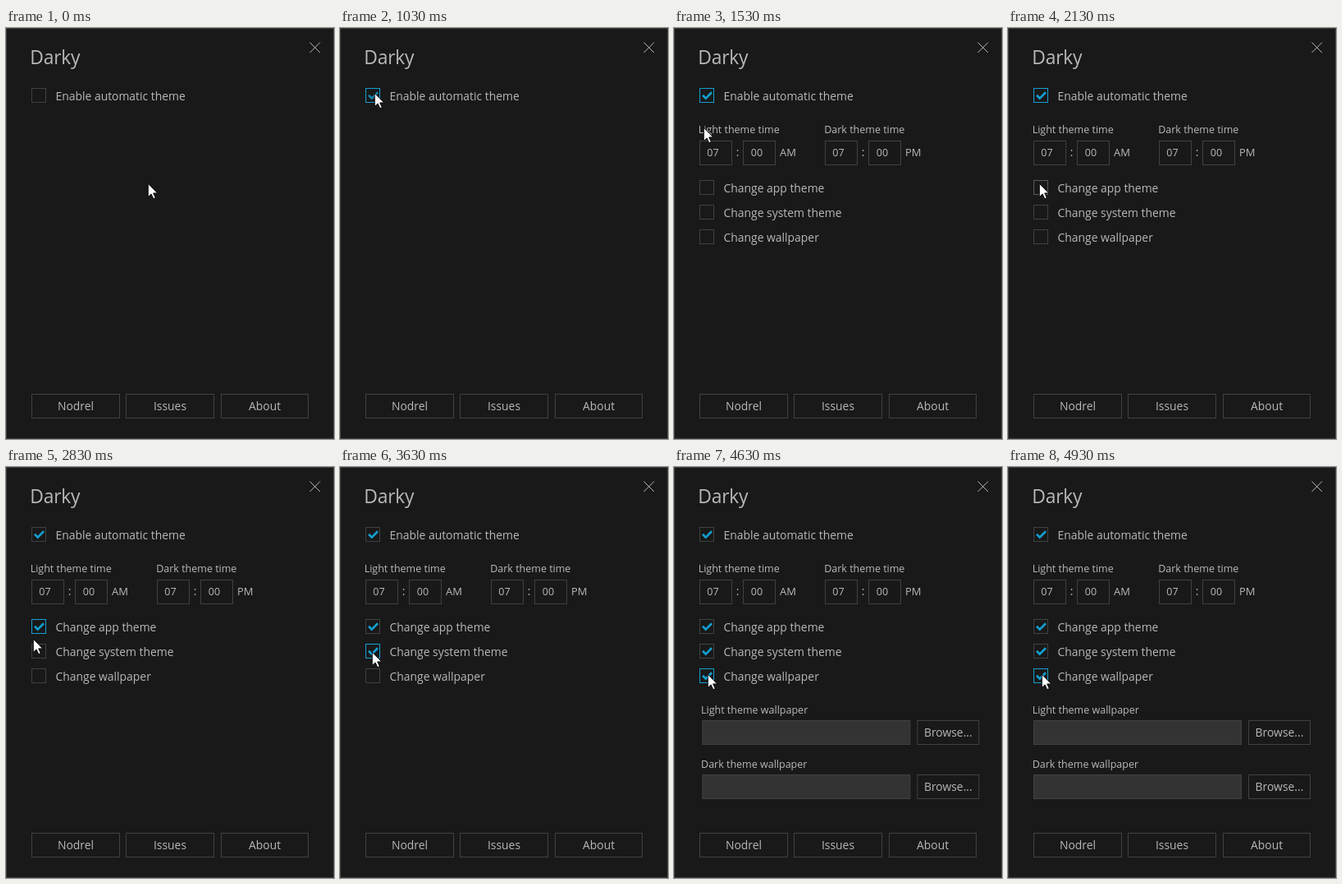
Animation, 400 px wide and 500 px high, one loop 5.21 s. Source, as an HTML page:

```html
<!DOCTYPE html>
<html>
<head>
<meta charset="utf-8">
<style>
html, body { margin: 0; width: 100%; height: 100%; overflow: hidden; background: #191919; }
svg { display: block; font: 13.9px "Open Sans", "Noto Sans", sans-serif; }
text { fill: #b9b9b9; white-space: pre; }
.small { font-size: 12.5px; }
.mid { text-anchor: middle; }
</style>
</head>
<body>
<svg id="stage" width="400" height="500" viewBox="0 0 400 500"></svg>
<script>
const LOOP = 5210, ACCENT = '#149fd0', LINE = '#414141';
const stage = document.getElementById('stage');

function add(parent, tag, attrs, content = '') {
  const node = document.createElementNS('http://www.w3.org/2000/svg', tag);
  for (const key in attrs) node.setAttribute(key, attrs[key]);
  node.textContent = content;
  parent.append(node);
  return node;
}
const group = () => add(stage, 'g', {});
const text = (parent, x, y, content, cls = '') => add(parent, 'text', { x, y, class: cls }, content);
const box = (parent, x, y, width, height, fill = 'none') =>
  add(parent, 'rect', { x: x + .5, y: y + .5, width: width - 1, height: height - 1, fill, stroke: LINE });
function button(parent, x, y, width, label) {
  box(parent, x, y, width, 30);
  text(parent, x + width / 2, y + 20, label, 'mid');
}

// Window frame
box(stage, 0, 0, 400, 500);
add(stage, 'text', { x: 29.3, y: 44, 'font-size': 22.8, 'letter-spacing': -.2 }, 'Darky');
add(stage, 'path', { d: 'M370.5 17.5l12.5 12.5m0-12.5l-12.5 12.5', stroke: '#b9b9b9', fill: 'none' });
['Nodrel', 'Issues', 'About'].forEach((label, i) => button(stage, [31, 146, 262][i], 445, i == 2 ? 107 : 108, label));

// Schedule panel
const schedule = group();
[['Light', 30, 'AM'], ['Dark', 183.5, 'PM']].forEach(([name, x, half]) => {
  const left = Math.floor(x) + 1;
  text(schedule, x - .3, 128, name + ' theme time', 'small');
  box(schedule, left, 137, 40, 30);
  box(schedule, left + 53, 137, 40, 30);
  text(schedule, left + 16.5, 156, '07', 'small mid');
  text(schedule, left + 70, 156, '00', 'small mid');
  text(schedule, left + 46.5, 156, ':', 'mid');
  add(schedule, 'text', { x: left + 98, y: 156, 'font-size': 13 }, half);
});

// Wallpaper panel
const wallpaper = group();
['Light', 'Dark'].forEach((name, i) => {
  const y = 308 + 66 * i;
  text(wallpaper, 29.7, y - 8, name + ' theme wallpaper', 'small');
  box(wallpaper, 31, y, 254, 30, '#333');
  button(wallpaper, 293, y, 76, 'Browse...');
});

// Check boxes: row top, label, press time, release time
const checks = [
  [stage, 73, 'Enable automatic theme', 930, 1015],
  [schedule, 185, 'Change app theme', 2250, 2350],
  [schedule, 215, 'Change system theme', 3440, 3540],
  [schedule, 245, 'Change wallpaper', 4370, 4460],
].map(([parent, y, label, press, release]) => {
  text(parent, 60.5, y + 15, label);
  return {
    y, press, release,
    frame: box(parent, 31, y, 18, 18),
    tick: add(parent, 'path', { d: `M35 ${y + 8.8}l3.7 3.8l7.3-7.4`, fill: 'none', stroke: ACCENT, 'stroke-width': 2.7 }),
  };
});

const cursor = add(stage, 'path', {
  d: 'M0 0V16.2L3.8 12.6L6.5 18.4L9 17.3L6.4 11.6H11.4Z',
  fill: '#fff', stroke: '#000', 'stroke-width': .9,
});

// Pointer path: time, x, y
const path = [
  [0, 173, 189], [680, 42, 79], [1190, 42, 79], [1530, 36, 121], [1630, 36, 136], [1950, 38, 189],
  [2600, 38, 189], [2830, 33, 209], [3110, 38, 225], [3210, 38, 225], [3230, 39, 225],
  [3740, 39, 225], [3930, 33, 232], [4130, 41, 252], [LOOP, 41, 252],
];
const clamp = v => Math.min(1, Math.max(0, v));

function pointer(t) {
  const i = path.findIndex(p => p[0] > t);
  const [t0, x0, y0] = path[i - 1], [t1, x1, y1] = path[i];
  let k = (t - t0) / (t1 - t0);
  if (i == 1) k = k * k * (3 - 2 * k);
  return [Math.round(x0 + (x1 - x0) * k), Math.round(y0 + (y1 - y0) * k)];
}

function slide(panel, age) {
  const dx = age < 0 ? 0 : 20 * Math.exp(-age / 80);
  panel.setAttribute('transform', `translate(${dx < .1 ? 0 : dx})`);
  panel.setAttribute('opacity', clamp(age / 130));
}

function draw(t) {
  const [x, y] = pointer(t);
  cursor.setAttribute('transform', `translate(${x + .3} ${y + .3})`);
  slide(schedule, t - 1047);
  slide(wallpaper, t - 4488);
  checks.forEach((c, i) => {
    const next = checks[i + 1];
    const focused = t >= c.press && !(next && t >= next.press);
    const hovered = x >= 31 && x < 218 && y >= c.y && y < c.y + 18;
    c.frame.setAttribute('stroke', focused ? ACCENT : hovered ? '#5a5a5a' : LINE);
    c.tick.setAttribute('opacity', clamp((t - c.release) / 20));
  });
}

const start = performance.now();
function tick() {
  draw((performance.now() - start) % LOOP);
  requestAnimationFrame(tick);
}
tick();
</script>
</body>
</html>
```
